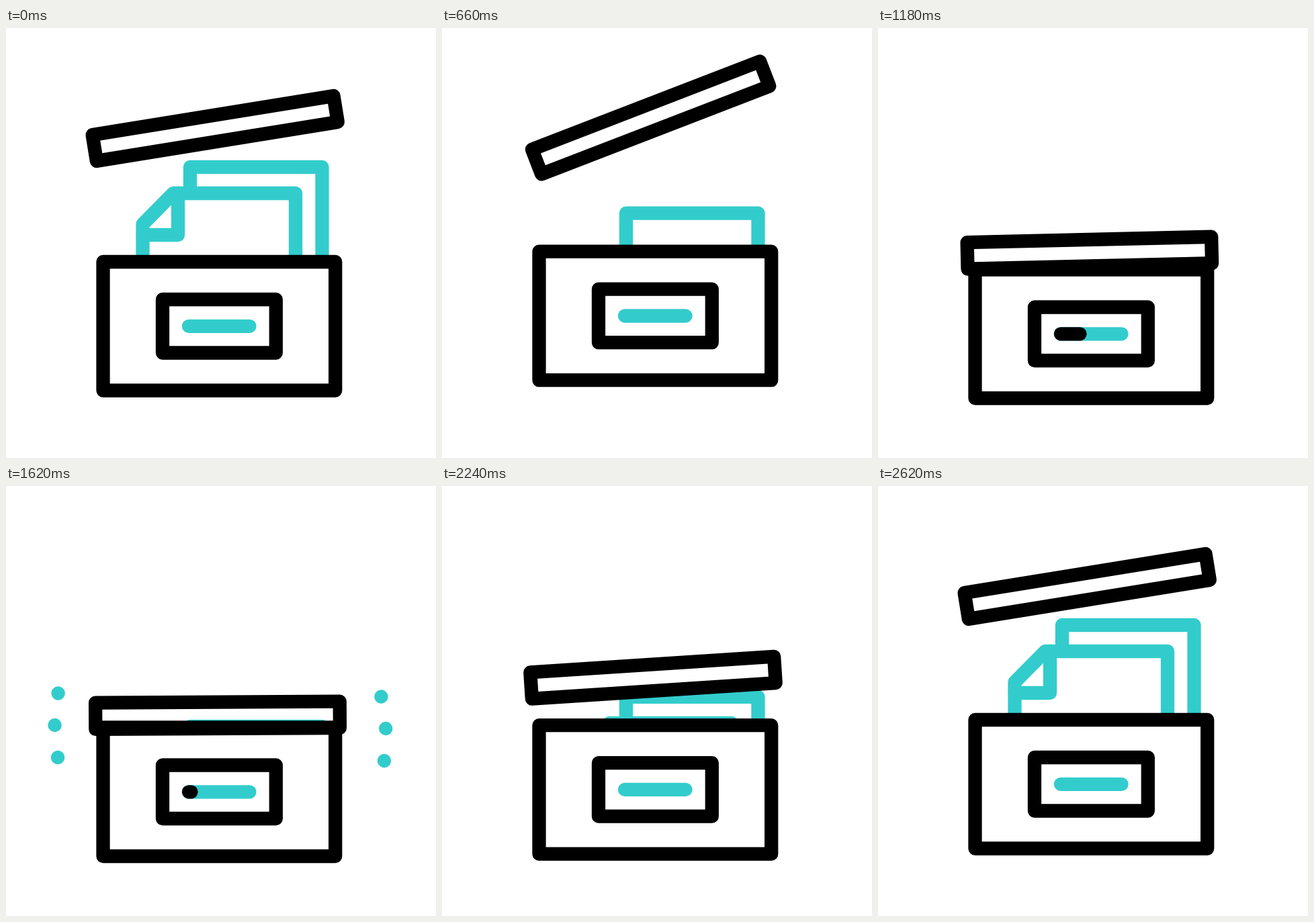
Animation of 640 by 640 pixels, one loop 3600 ms. Source, as an HTML page with a canvas:

```html
<!DOCTYPE html>
<html lang="en">
<head>
<meta charset="utf-8">
<title>Archive box</title>
<style>
html, body { margin: 0; height: 100%; overflow: hidden; background: #fff; }
canvas { display: block; width: 100vw; height: 100vh; object-fit: contain; }
</style>
</head>
<body>
<canvas id="stage" width="640" height="640"></canvas>
<script>
const ctx = document.getElementById('stage').getContext('2d');
const LOOP = 3600, BLACK = '#000', TEAL = '#33cccc', WHITE = '#fff';

// Eased progress from 0 at start to 1 at end.
function ease(t, start, end) {
  const x = Math.min(1, Math.max(0, (t - start) / (end - start)));
  return x * x * (3 - 2 * x);
}

const reopen = t => ease(t, 2030, 2620);

// Everything hops up, drops to its closed place, then returns on reopening.
const hop = (t, up, top, down, end) =>
  -up * ease(t, 0, top) + (up + down) * ease(t, top, end) - down * reopen(t);

const boxY = t => hop(t, 37.3, 425, 11.5, 930);
const pageY = (t, top) => hop(t, 49, top, 151, top + 440);
const lidY = t => 149.5 + hop(t, 35.5, 530, 191.8, 1255);
const lidAngle = t => -9.2 - 12.4 * ease(t, 400, 600)
  + 21.3 * ease(t, 600, 1270) - 8.9 * ease(t, 1965, 2620);

function line(points, color, closed, fill) {
  ctx.beginPath();
  points.forEach(p => ctx.lineTo(...p));
  if (closed) ctx.closePath();
  if (fill) { ctx.fillStyle = WHITE; ctx.fill(); }
  ctx.strokeStyle = color;
  ctx.stroke();
}

const rect = (x0, y0, x1, y1, fill) =>
  line([[x0, y0], [x1, y0], [x1, y1], [x0, y1]], BLACK, true, fill);

function drawPages(t, floor) {
  const back = 207 + pageY(t, 415), front = 246 + pageY(t, 341);
  const fold = 308 + pageY(t, 367); // the folded corner trails its page
  line([[274, floor], [274, back], [470.5, back], [470.5, floor]], TEAL, false, true);
  line([[203.5, floor], [203.5, front + 46], [249, front], [431, front], [431, floor]],
    TEAL, false, true);
  line([[203.5, fold], [256, fold], [256, front]], TEAL);
}

function drawBox(t, y) {
  rect(144.5, 348 + y, 490.2, 539.5 + y, true);
  rect(233, 404 + y, 401.8, 483.5 + y);
  const mid = 443.8 + y;
  const ink = 90.5 * (ease(t, 1070, 1367) - ease(t, 1367, 1655));
  line([[272, mid], [362.5, mid]], TEAL);
  if (ink > 0) line([[272, mid], [272 + ink, mid]], BLACK);
}

function drawLid(t) {
  const angle = lidAngle(t);
  ctx.save();
  ctx.translate(315 - 4.4 * ease(-angle, 0, 12), lidY(t));
  ctx.rotate(angle * Math.PI / 180);
  rect(-181.8, -19.7, 181.8, 19.7);
  ctx.restore();
}

// Short strokes shoot away from the box and shrink to dots at their outer ends.
const rays = [[77.5, 308.5], [72.5, 356], [77, 404], [558.5, 313.5], [565.3, 361], [563, 409]];

function drawRays(t) {
  if (t < 1330 || t >= 1640) return;
  const tail = 0.1 * (1 - ease(t, 1460, 1630)), head = 0.1 * (1 - ease(t, 1320, 1480));
  for (const [x, y] of rays) {
    const at = k => [x + (318 - x) * k, y + (358 - y) * k];
    line([at(tail), at(head - 0.0001)], TEAL);
  }
}

function draw(t) {
  ctx.fillStyle = WHITE;
  ctx.fillRect(0, 0, 640, 640);
  ctx.lineWidth = 20.3;
  ctx.lineJoin = ctx.lineCap = 'round';
  const y = boxY(t);
  drawPages(t, 500 + y);
  drawBox(t, y);
  drawLid(t);
  drawRays(t);
}

const start = performance.now();
function tick() {
  draw((performance.now() - start) % LOOP);
  requestAnimationFrame(tick);
}
tick();
</script>
</body>
</html>
```
